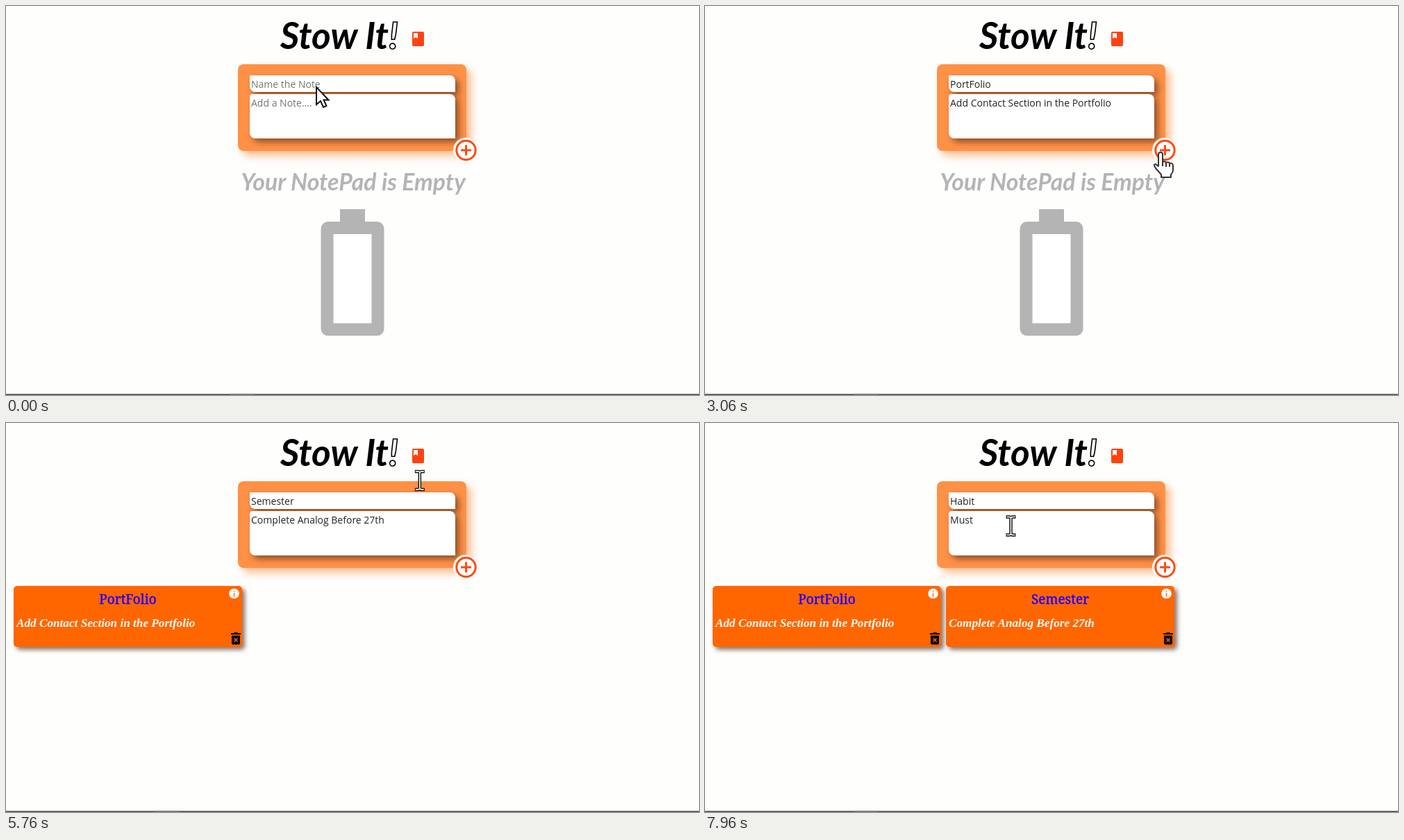
An HTML page that plays this animation: 998x561 px, repeating every 8 s.

```html
<!DOCTYPE html>
<html lang="en">
<head>
<meta charset="utf-8">
<title>Notes</title>
<style>
  html, body { margin: 0; width: 100%; height: 100%; overflow: hidden; background: #fefefd; }
  #stage { position: relative; width: 998px; height: 561px; overflow: hidden; }
  #stage > * { position: absolute; }
  #form { left: 334px; top: 84px; width: 329px; height: 125px; border-radius: 8px;
    background: #ff9147; box-shadow: 7px 7px 12px rgba(255, 145, 71, .6); }
  .field { left: 351px; width: 294px; padding-left: 2px; background: #fff; color: #222;
    font: 14px/26px "Open Sans", sans-serif; white-space: pre;
    border-radius: 0 8px 0 8px; box-shadow: 5px 5px 10px rgba(0, 0, 0, .45); }
  #name { top: 100px; height: 24px; }
  #note { top: 127px; height: 64px; border-top-left-radius: 4px; }
  .field.blank { color: #757575; }
  .field.focused::after { content: ""; display: inline-block; width: 1px; height: 19px;
    vertical-align: -4px; background: #222; }
  .field.blank.focused::after { position: absolute; left: 2px; top: 4px; }
  .card { top: 235px; width: 329px; height: 88px; border-radius: 5px; background: #f60;
    box-shadow: 4px 4px 6px rgba(70, 25, 0, .6); }
  .card * { position: absolute; margin: 0; }
  .card h2 { width: 100%; text-align: center; color: #2000ff; -webkit-text-stroke: .4px #2000ff;
    font: 500 19px/39px "Noto Serif", serif; }
  .card p { left: 4px; top: 40px; color: #fff; white-space: nowrap;
    font: italic bold 17.2px/28px "Liberation Serif", serif; }
  .brush { font-family: Lato, sans-serif; font-style: italic; font-weight: bold; text-anchor: middle; }
</style>
</head>
<body>
<div id="stage">
  <div id="form"></div>
  <div id="name" class="field"></div>
  <div id="note" class="field"></div>
  <svg id="overlay" width="998" height="561">
    <text class="brush" x="480" y="62" font-size="53">Stow It<tspan fill="#fff" stroke="#000" stroke-width="1.6">!</tspan></text>
    <rect x="585" y="37" width="17" height="21" rx="2" fill="#ff4310"/>
    <path d="M587 39h6v8l-3-2-3 2z" fill="#fff"/>
    <circle cx="662" cy="208" r="18" fill="#fff"/>
    <g fill="none" stroke="#fb4b10" stroke-width="3">
      <circle cx="662.5" cy="208" r="13.7"/>
      <path d="M655 208h15M662.5 200.500v15"/>
    </g>
    <g id="empty" fill="#b4b4b4">
      <text class="brush" x="500" y="266" font-size="33.8">Your NotePad is Empty</text>
      <path d="M481 293h36v20h-36z"/>
      <rect x="453.500" y="311" width="91" height="164.500" rx="10"/>
      <path d="M471.500 329h55v128.500h-55z" fill="#fff"/>
    </g>
    <path d="M0 560.200h998" stroke="#444" stroke-width="1.600"/>
    <path id="tab" d="M0 560.200h36" stroke="#777" stroke-width="1.600"/>
    <g id="arrow" fill="#fff" stroke="#111" stroke-width="2">
      <path d="M0 0v25l6-5 4 9 4.500-2-4-8.500h7z"/>
    </g>
    <g id="beam" fill="none">
      <path d="M-7-13h5l2 1 2-1h5M0-12v24M-7 13h5l2-1 2 1h5" stroke="#111" stroke-width="4.500"/>
      <path d="M-6-13h4l2 1 2-1h4M0-12v24M-6 13h4l2-1 2 1h4" stroke="#fff" stroke-width="1.600"/>
    </g>
    <g id="hand" fill="#fff" stroke="#333" stroke-width="2" stroke-linejoin="round">
      <path d="M-3 3a3 3 0 0 1 6 0v11q4-2 5 1q4-2 5 1q5-1 5 3v7q0 3-3 6v4h-14v-4l-8-9q-4-6 0-6l4 3z"/>
      <path d="M3 14v6M8 15v6M13 16v5" fill="none"/>
    </g>
  </svg>
</div>
<script>
const LOOP = 8000;
const byId = id => document.getElementById(id);

// Each key is [time, typed characters].
const notes = [
  { title: "PortFolio", text: "Add Contact Section in the Portfolio",
    focus: 300, next: 1080, blur: 2900, saved: 3120,
    titleKeys: [[450, 0], [930, 9]],
    textKeys: [[1120, 0], [1450, 7], [1700, 13], [2600, 31], [2820, 36]] },
  { title: "Semester", text: "Complete Analog Before 27th",
    focus: 3500, next: 4040, blur: 5620, saved: 5950,
    titleKeys: [[3560, 0], [3980, 8]],
    textKeys: [[4080, 0], [4330, 4], [4690, 10], [5130, 19], [5530, 27]] },
  { title: "Habit", text: "Must be",
    focus: 6330, next: 7250, blur: 7940, saved: Infinity,
    titleKeys: [[6380, 0], [6420, 1], [6650, 5]],
    textKeys: [[7420, 0], [7690, 5], [7800, 7], [7850, 7], [7945, 4]] }
];

// Each key is [time, x, y].
const pointerPath = [
  [0, 447, 117], [110, 449.5, 118], [2830, 449.5, 118], [2930, 745, 76], [3030, 656, 211],
  [3170, 656, 211], [3430, 487, 118], [5570, 487, 118], [5760, 593, 83], [5840, 820, 74],
  [5920, 656, 211], [6040, 656, 211], [6300, 457.5, 119], [6900, 457.5, 119], [7150, 440.5, 148.5]
];

const cards = notes.slice(0, 2).map((note, i) => {
  const card = document.createElement("div");
  card.className = "card";
  card.style.left = 11 + 336 * i + "px";
  card.innerHTML = `<h2>${note.title}</h2><p>${note.text}</p>
    <svg width="329" height="88">
      <circle cx="317.500" cy="11" r="7.300" fill="#fff"/>
      <path d="M317.500 7v1.500M317.500 10v5" stroke="#f60" stroke-width="1.500"/>
      <path d="M313 68h4l1-1h4l1 1h4v2h-14zM314 71.500h12v11q0 2-2 2h-8q-2 0-2-2z"/>
      <path d="M317.500 75.500l5 5m0-5l-5 5" stroke="#f60" stroke-width="1.600"/>
    </svg>`;
  byId("stage").insertBefore(card, byId("overlay"));
  return card;
});

function sample(keys, t) {
  const i = keys.findIndex(key => key[0] > t);
  if (i === 0) return keys[0].slice(1);
  if (i < 0) return keys[keys.length - 1].slice(1);
  const [a, b] = [keys[i - 1], keys[i]];
  const u = (t - a[0]) / (b[0] - a[0]);
  return a.slice(1).map((v, k) => v + (b[k + 1] - v) * u);
}

function show(element, visible) {
  element.style.display = visible ? "" : "none";
}

function fill(id, text, keys, placeholder, focused, t) {
  const typed = text.slice(0, Math.floor(sample(keys, t)[0]));
  const field = byId(id);
  field.textContent = typed || placeholder;
  field.classList.toggle("blank", !typed);
  field.classList.toggle("focused", focused);
}

function drawPointer(t) {
  const [x, y] = sample(pointerPath, t);
  const overButton = Math.hypot(x - 662, y - 208) < 18;
  const outside = y < 80 || x > 663;
  const kind = overButton ? "hand" : t < 100 || outside ? "arrow" : "beam";
  for (const id of ["arrow", "beam", "hand"]) show(byId(id), id === kind);
  byId(kind).setAttribute("transform", `translate(${x} ${y})`);
}

function draw(t) {
  const note = notes.find(n => t < n.saved);
  fill("name", note.title, note.titleKeys, "Name the Note", t >= note.focus && t < note.next, t);
  fill("note", note.text, note.textKeys, "Add a Note....", t >= note.next && t < note.blur, t);
  cards.forEach((card, i) => show(card, t >= notes[i].saved));
  show(byId("empty"), t < notes[0].saved);
  byId("tab").setAttribute("transform", `translate(${t < 300 ? 322 : 214})`);
  drawPointer(t);
}

const start = performance.now();
function tick() {
  draw((performance.now() - start) % LOOP);
  requestAnimationFrame(tick);
}
tick();
</script>
</body>
</html>
```
